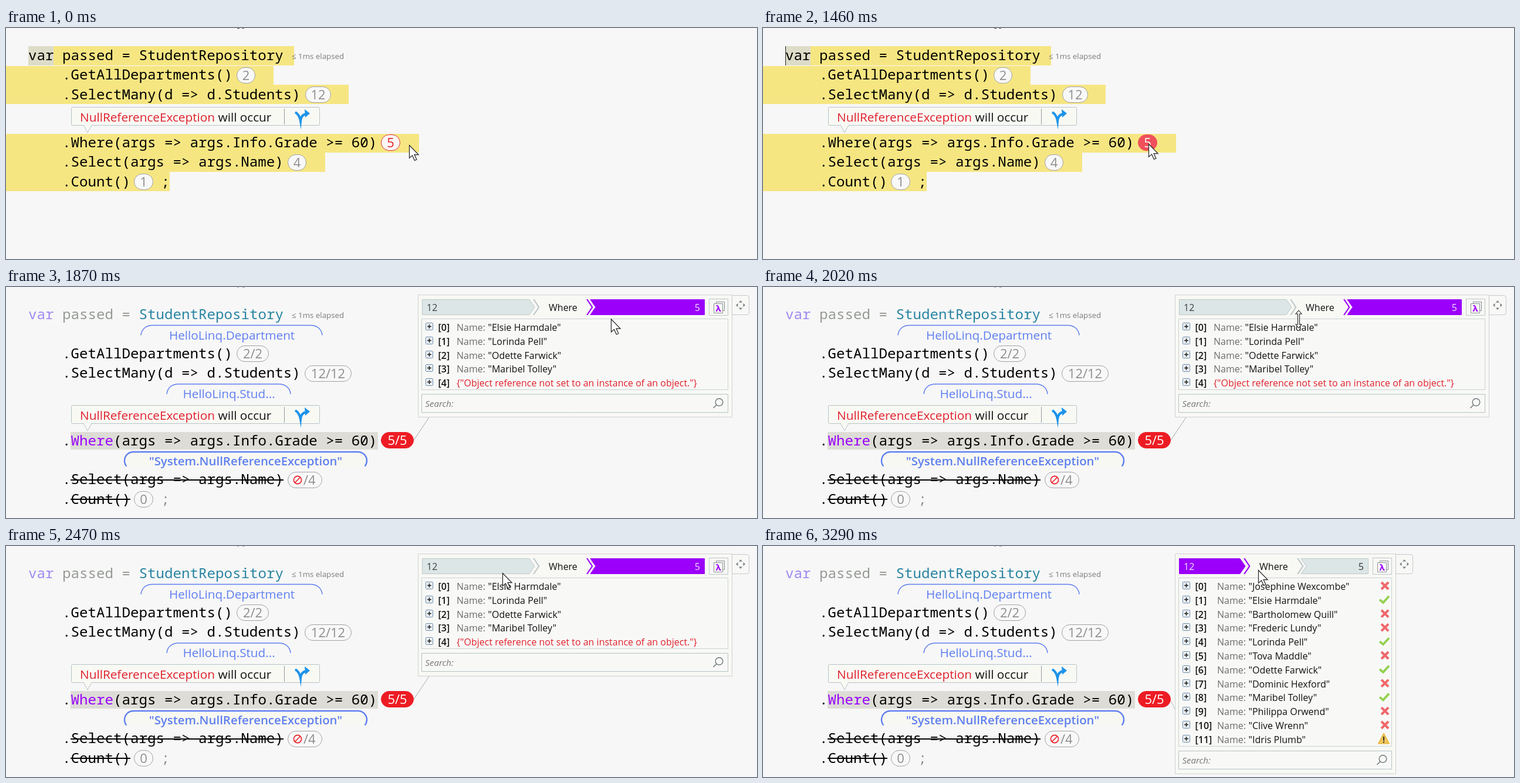
Animation, 1280 px wide and 395 px high, one loop 7520 ms. Source, as an HTML page with a canvas:

```html
<!DOCTYPE html>
<html lang="en">
<head>
<meta charset="utf-8">
<title>LINQ debugging</title>
<style>
html, body { margin: 0; width: 100%; height: 100%; overflow: hidden; background: #f7f7f7; }
canvas { display: block; width: 100%; height: 100%; }
</style>
</head>
<body>
<canvas id="stage" width="1280" height="395"></canvas>
<script>
const c = document.getElementById('stage').getContext('2d');
const LOOP = 7520, OPEN = 1720, SWITCH = 3290;
const UI = '"Open Sans", "Noto Sans", sans-serif';
const MONO = '24.17px "Noto Sans Mono", monospace';
const COL = 14.5, LEFT = 38, ROW = 23.8;
const RED = '#ed1c24', PURPLE = '#9a00fa', BLUE = '#5f7ff0', GRAY = '#8e8e8e', YELLOW = '#f6e682';

const passing = ['Elsie Harmdale', 'Lorinda Pell', 'Odette Farwick', 'Maribel Tolley'];
// Verdicts: x = filtered out, v = passed, ! = failed with an exception
const everyone = [
  ['Josephine Wexcombe', 'x'], [passing[0], 'v'], ['Bartholomew Quill', 'x'],
  ['Frederic Lundy', 'x'], [passing[1], 'v'], ['Tova Maddle', 'x'],
  [passing[2], 'v'], ['Dominic Hexford', 'x'], [passing[3], 'v'],
  ['Philippa Orwend', 'x'], ['Clive Wrenn', 'x'], ['Idris Plumb', '!']
];

function text(str, x, y, color, size, style = '', align = 'left') {
  c.font = `${style} ${size}px ${UI}`;
  c.textAlign = align;
  c.fillStyle = color;
  c.fillText(str, x, y);
}

function code(str, col, y, color = '#000') {
  c.font = MONO;
  c.textAlign = 'left';
  c.fillStyle = color;
  c.fillText(str, LEFT + col * COL, y);
}

function rect(x1, y1, x2, y2, color) {
  c.fillStyle = color;
  c.fillRect(x1, y1, x2 - x1, y2 - y1);
}

function paint(fill, stroke, width = 1) {
  c.lineWidth = width;
  if (fill) { c.fillStyle = fill; c.fill(); }
  if (stroke) { c.strokeStyle = stroke; c.stroke(); }
}

function box(x1, y1, x2, y2, fill, stroke, radius = 0) {
  c.beginPath();
  c.roundRect(x1 + .5, y1 + .5, x2 - x1 - 1, y2 - y1 - 1, radius);
  paint(fill, stroke);
}

function path(points, closed) {
  c.beginPath();
  points.forEach(([x, y]) => c.lineTo(x, y));
  if (closed) c.closePath();
}

function line(points, color, width = 1) {
  path(points);
  paint(null, color, width);
}

function pill(str, x1, x2, y, fill = '#f8f8f8', stroke = '#a2a2a2', color = GRAY, size = 22) {
  box(x1, y - 14, x2, y + 14, fill, stroke, 13.5);
  text(str, (x1 + x2) / 2, y + 8, color, size, '', 'center');
}

function arrow(x, y) {
  c.save();
  c.translate(x + .5, y + .5);
  path([[0, 0], [0, 22], [5, 17.4], [8.9, 26], [12.4, 24.5], [8.6, 16.2], [15.6, 16.2]], true);
  paint('#fff', '#222', 1.2);
  c.restore();
}

function resizeArrow(x, y) {
  const half = [[-1.5, 9], [-5, 9], [0, 15], [5, 9], [1.5, 9]];
  const other = half.map(([px, py]) => [-px, -py]);
  path([...half, ...other].map(([px, py]) => [x + px, y + py]), true);
  paint('#fff', '#222', 1.1);
}

function tooltip(y) {
  c.beginPath();
  c.roundRect(111.5, y + .5, 423, 31, 2);
  paint('#f9f9f4', '#b7c3c7');
  path([[132, y + 31], [139, y + 44], [146, y + 31]]);
  paint('#f9f9f4', '#b7c3c7');
  rect(133, y + 30, 145, y + 31.2, '#f9f9f4');
  text('NullReferenceException', 126, y + 25, '#e0202c', 20.75);
  text('will occur', 361.5, y + 25, '#111', 20.75);
  line([[474.5, y + 3], [474.5, y + 30]], '#8f9a9e');
  c.beginPath();
  c.moveTo(493, y + 9);
  c.quadraticCurveTo(500, y + 13, 502, y + 24);
  c.quadraticCurveTo(503, y + 13, 512, y + 12);
  paint(null, '#1c93ea', 4);
  path([[509, y + 4], [518, y + 11], [510, y + 18]], true);
  paint('#1c93ea');
}

function bracket(x1, x2, y) {
  c.beginPath();
  c.moveTo(x1, y + 17);
  c.bezierCurveTo(x1 + 1, y + 7, x1 + 8, y, x1 + 20, y);
  c.lineTo(x2 - 20, y);
  c.bezierCurveTo(x2 - 8, y, x2 - 1, y + 7, x2, y + 17);
  paint(null, BLUE, 1.5);
}

function elapsed() {
  text('≤ 1ms elapsed', 487, 53, '#7c7c7c', 13.3);
}

function plainCode(t) {
  rect(394, 0, 398, 1, '#333');
  rect(402, 0, 406, 1, '#555');
  [[38, 31, 491, 64], [0, 65, 456, 97], [0, 97, 584, 130],
   [0, 181, 704, 213], [0, 213, 544, 246], [0, 246, 279, 279]]
    .forEach(b => rect(...b, YELLOW));
  rect(38, 31, 81, 64, '#dddcc8');
  if (t >= 500) rect(38, 31, 39, 64, '#222');
  code('var passed = StudentRepository', 0, 55);
  elapsed();
  code('.GetAllDepartments()', 4, 88);
  code('.SelectMany(d => d.Students)', 4, 122);
  code('.Where(args => args.Info.Grade >= 60)', 4, 204);
  code('.Select(args => args.Name)', 4, 237);
  code('.Count()', 4, 271);
  code(';', 15.6, 271);
  pill('2', 393, 425, 81);
  pill('12', 510, 554, 114);
  pill('4', 480, 512, 230);
  pill('1', 218, 251, 263);
  if (t < 600) {
    pill('5', 639, 672, 196, '#fbf6f4', '#e2323a', '#e0202c');
  } else {
    const fill = t < 1460 ? '#f3606a' : '#f0505a';
    pill('5', 639, 672, 196, fill, fill, '#fff');
  }
  tooltip(135);
}

function inspectedCode() {
  line([[394, 0], [397, 1]], '#999');
  line([[403, 1], [407, 0]], '#999');
  code('var', 0, 55, '#9f8af2');
  code('passed', 4, 55, '#969a94');
  code('=', 11, 55, '#969a94');
  code('StudentRepository', 13, 55, '#2a85a2');
  elapsed();

  bracket(230, 539, 65.5);
  text('HelloLinq.Department', 278, 90, BLUE, 20.7);
  code('.GetAllDepartments()', 4, 122);
  pill('2/2', 393, 448, 114);
  code('.SelectMany(d => d.Students)', 4, 155);
  pill('12/12', 509, 589, 148);
  bracket(274, 485, 166);
  text('HelloLinq.Stud...', 301.5, 190, BLUE, 20.7);
  tooltip(202);

  rect(110, 248, 634, 278, '#dddcd6');
  code('.', 4, 271);
  code('Where', 5, 271, PURPLE);
  code('(args => args.Info.Grade >= 60)', 10, 271);
  pill('5/5', 639, 695, 262, RED, RED, '#fff');

  c.beginPath();
  c.arc(217, 297, 15, Math.PI * .78, Math.PI * 1.5);
  c.arc(600, 297, 15, Math.PI * 1.5, Math.PI * 2.22);
  paint('#f8f8f2', BLUE, 2.4);
  text('"System.NullReferenceException"', 408.5, 305, BLUE, 20.4, '600', 'center');

  code('.Select(args => args.Name)', 4, 337);
  line([[110, 330], [473, 330]], '#000', 1.8);
  pill('', 480, 539, 330);
  text('/4', 507, 338, GRAY, 22);
  c.beginPath();
  c.arc(497, 330, 6.6, 0, Math.PI * 2);
  paint(null, RED, 1.6);
  line([[492.5, 334.5], [501.5, 325.5]], RED, 1.6);
  code('.Count()', 4, 371);
  line([[110, 363], [212, 363]], '#000', 1.8);
  pill('0', 218, 251, 363);
  code(';', 15.6, 371, '#8c908c');
}

function mix(a, b, k) {
  return `rgb(${a.map((v, i) => Math.round(v + (b[i] - v) * k))})`;
}

function chevron(x, color) {
  path([[x, 21], [x + 2.5, 21], [x + 11.5, 34.5], [x + 2.5, 48], [x, 48], [x + 9, 34.5]], true);
  paint(color);
}

function header(tip, right, first, second, edge1, edge2, ink1, ink2) {
  path([[709.5, 21.5], [tip - 9, 21.5], [tip, 34.5], [tip - 9, 47.5], [709.5, 47.5]], true);
  paint(first, edge1);
  chevron(tip - 3, edge1);
  text('12', 717, 41, ink1, 16);
  text('Where', tip + 24, 41, '#111', 16);
  const x = tip + 95;
  chevron(x - 7, edge2);
  path([[x, 21.5], [right - 47.5, 21.5], [right - 47.5, 47.5], [x, 47.5], [x + 9, 34.5]], true);
  paint(second, edge2);
  text('5', right - 55, 41, ink2, 16, '', 'right');
}

function lambdaButton(right, hot) {
  box(right - 40, 20, right - 7, 49, hot ? '#d3dfe0' : '#f7f8f6', '#bdc8c9');
  box(right - 28, 25, right - 13, 41, '#f4f4f4', '#8b9192');
  box(right - 32, 28, right - 16, 45, '#fafafa', '#8b9192');
  text('λ', right - 24, 42, PURPLE, 15, '700', 'center');
}

function moveTab(x) {
  box(x - 1, 14, x + 29, 48, '#f8f8f6', '#c6cacb', [0, 4, 4, 0]);
  for (let i = 0; i < 4; i++) {
    c.save();
    c.translate(x + 14, 31);
    c.rotate(i * Math.PI / 2);
    path([[-3.2, -4.5], [0, -8], [3.2, -4.5]], true);
    paint('#7b8184');
    c.restore();
  }
}

function verdict(kind, x, y) {
  if (kind === 'x') {
    line([[x - 6, y - 6], [x + 6, y + 6]], '#ef686b', 4);
    line([[x + 6, y - 6], [x - 6, y + 6]], '#ef686b', 4);
  } else if (kind === 'v') {
    line([[x - 9, y], [x - 3, y + 5], [x + 7, y - 6]], '#93d150', 3.8);
  } else {
    path([[x - 2, y - 9], [x + 7, y + 8], [x - 11, y + 8]], true);
    c.lineJoin = 'round';
    paint('#f1c75a', '#e9bd4c', 2);
    c.lineJoin = 'miter';
    line([[x - 2, y - 4], [x - 2, y + 3]], '#333', 2.2);
    rect(x - 3.1, y + 4.5, x - .9, y + 6.7, '#333');
  }
}

function item(i, nameX, name) {
  const y = 69 + i * ROW;
  box(715, Math.round(y - 8), 728, Math.round(y + 5), '#eef4fa', '#6b88a5', 1);
  const my = Math.round(y - 8) + 6.5;
  line([[718, my], [725, my]], '#222', 1.6);
  line([[721.5, my - 3.5], [721.5, my + 3.5]], '#222', 1.6);
  text(`[${i}]`, 736.5, y + 6, '#111', 16, '600');
  if (!name) return;
  text('Name:', nameX - 1, y + 6, '#6b6b6b', 16);
  text(`"${name}"`, nameX + 52.5, y + 6, '#111', 16);
}

function panel(right, bottom) {
  box(702, 13, right, bottom, '#f8f8f5', '#cfd2d0');
  moveTab(right);
  box(708, 54, right - 7, bottom - 47, '#f8f9f7', '#c9d2d3');
  box(708, bottom - 40, right - 7, bottom - 8, '#f8f9f7', '#b5c2c5');
  text('Search:', 714.5, bottom - 18, '#777', 15, 'italic');
  const x = right - 22.5, y = bottom - 26;
  c.beginPath();
  c.arc(x, y, 6.3, 0, Math.PI * 2);
  paint(null, '#70777a', 1.4);
  line([[x - 4.5, y + 4.5], [x - 10, y + 10]], '#70777a', 1.6);
}

function resultPanel(t) {
  line([[695, 262], [721, 223]], '#a3a8aa');
  panel(1238, 223);
  const hover = t < 2500 ? 0 : Math.min(1, (Math.floor((t - 2500) / 30) + 1) / 3);
  const fill = mix([220, 230, 230], [206, 131, 247], hover);
  const edge = mix([190, 200, 201], [200, 124, 246], hover);
  header(901, 1238, fill, PURPLE, edge, PURPLE, mix([60, 64, 64], [255, 255, 255], hover), '#f3e4ff');
  lambdaButton(1238, t < OPEN + 30);
  passing.forEach((name, i) => item(i, 769, name));
  item(4);
  text('{"Object reference not set to an instance of an object."}', 768, 69 + 4 * ROW + 6, '#e0202c', 16);
}

function sourcePanel() {
  line([[695, 264], [702, 279]], '#b5b9ba');
  panel(1079, 390);
  header(822, 1079, PURPLE, '#dce6e6', PURPLE, '#bec8c9', '#f3e4ff', '#333');
  lambdaButton(1079, false);
  everyone.forEach(([name, kind], i) => {
    item(i, 775, name);
    verdict(kind, 1060, 68 + i * ROW);
  });
}

function pointer(t) {
  if (t < 500) return [687, 200];
  if (t < 600) return [671, 199];
  if (t < OPEN) return [657, 198];
  if (t >= 2890) return [844, 41];
  if (t >= 2500) return [845, 45 - Math.min(2, Math.floor((t - 2500) / 30))];
  const s = OPEN + Math.floor((t - OPEN) / 30) * 30;
  if (s < 2020) {
    const k = (s - OPEN) / 300;
    return [1149 - 236 * k, 54 + k];
  }
  const k = 1 - (1 - Math.min(1, (s - 2020) / 450)) ** 3;
  return [913 - 67 * k, 55 - 9 * k];
}

const start = performance.now();

function draw() {
  const t = (performance.now() - start) % LOOP;
  rect(0, 0, 1280, 395, '#f7f7f7');
  if (t < OPEN) {
    plainCode(t);
  } else {
    inspectedCode();
    if (t < SWITCH) resultPanel(t); else sourcePanel();
  }
  const [x, y] = pointer(t);
  if (t >= 1990 && t < 2080) resizeArrow(x, y); else arrow(x, y);
  requestAnimationFrame(draw);
}
draw();
</script>
</body>
</html>
```
